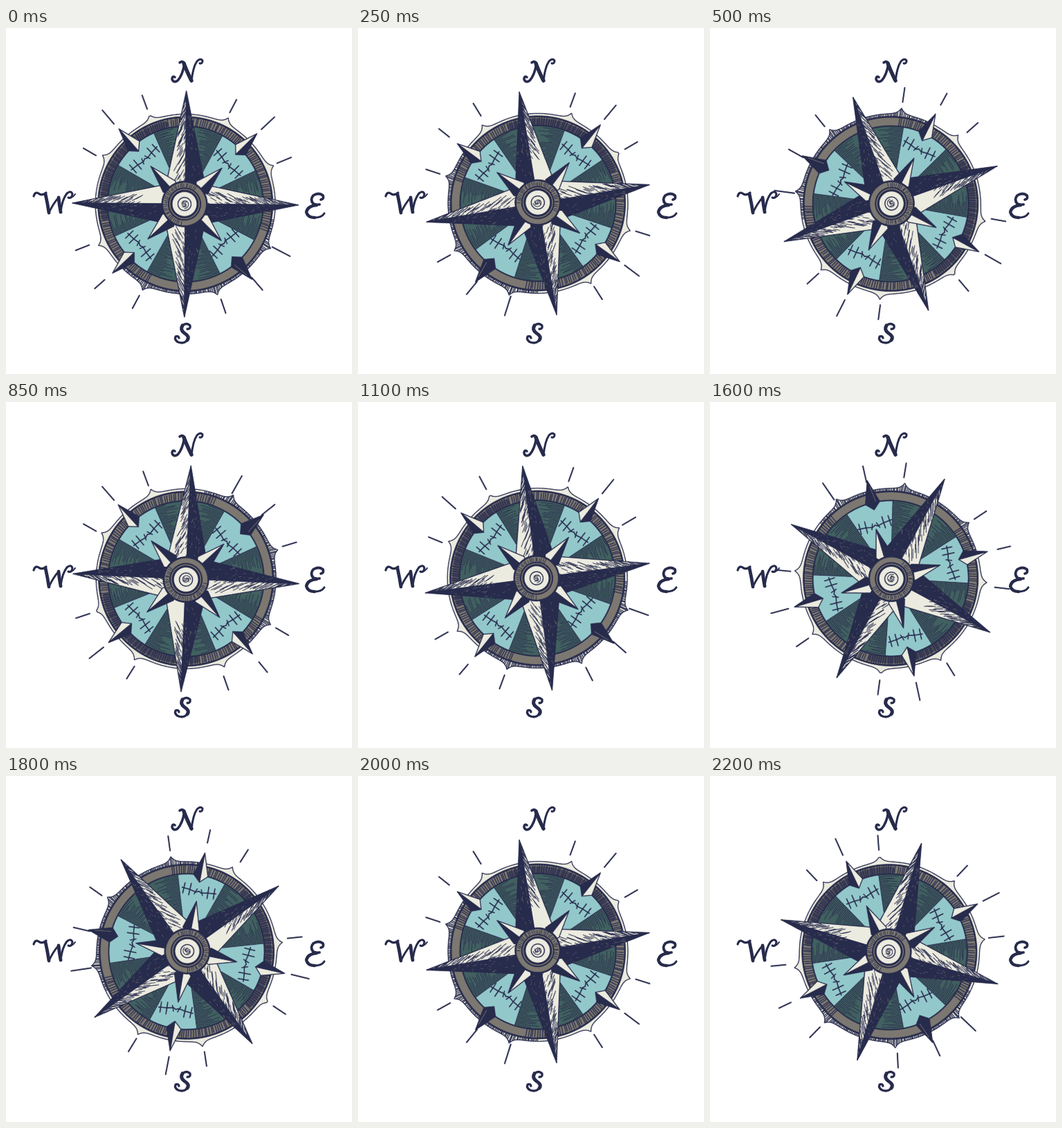
An HTML page with a canvas that plays this animation: 500x500 px, repeating every 2.25 s.

```html
<!DOCTYPE html>
<html lang="en">
<head>
<meta charset="utf-8">
<title>Compass rose</title>
<style>
html, body { margin: 0; width: 100%; height: 100%; overflow: hidden; background: #fff; }
canvas { display: block; width: 500px; height: 500px; }
</style>
</head>
<body>
<canvas id="stage" width="500" height="500" role="img" aria-label="Compass rose with N, E, S, W"></canvas>
<script>
const NAVY = '#272b4c', CREAM = '#ecebdf', GREY = '#7c7871', TEAL = '#416060', BLUE = '#93c8cb';
const CX = 260.2, CY = 254.4;
const STEP_MS = 50, STEPS = 45, TURN = 16, START = 0.5;
const SCALE = 2, SIZE = 400;

let seed = 11;
const rnd = () => (seed = (seed * 16807) % 2147483647) / 2147483647;
const vary = n => (rnd() * 2 - 1) * n;
const rad = d => d * Math.PI / 180;
const polar = (deg, r) => [r * Math.sin(rad(deg)), -r * Math.cos(rad(deg))];

const rose = document.createElement('canvas');
rose.width = rose.height = SIZE * SCALE;
const g = rose.getContext('2d');
g.scale(SCALE, SCALE);
g.translate(SIZE / 2 - 1, SIZE / 2);
g.lineCap = g.lineJoin = 'round';

function trace(pts, closed) {
  g.beginPath();
  pts.forEach(p => g.lineTo(p[0], p[1]));
  if (closed) g.closePath();
}
function poly(pts, fill, width = 1.2) {
  trace(pts, true);
  if (fill) { g.fillStyle = fill; g.fill(); }
  if (width) { g.strokeStyle = NAVY; g.lineWidth = width; g.stroke(); }
}
function line(pts, width, color = NAVY) {
  trace(pts);
  g.strokeStyle = color;
  g.lineWidth = width;
  g.stroke();
}
function disc(r, fill, width) {
  g.beginPath();
  g.arc(0, 0, r, 0, 7);
  if (fill) { g.fillStyle = fill; g.fill(); }
  if (width) { g.strokeStyle = NAVY; g.lineWidth = width; g.stroke(); }
}
function turned(deg, draw) {
  g.save();
  g.rotate(rad(deg));
  draw();
  g.restore();
}
function inside(pts, draw) {
  g.save();
  trace(pts, true);
  g.clip();
  draw();
  g.restore();
}
function spokes(from, to, step, r0, r1, width) {
  for (let a = from; a < to; a += step) {
    const d = a + vary(step * 0.3);
    line([polar(d, r0 + vary(1)), polar(d + 0.4, r1 + vary(1.5))], width);
  }
}

function drawRays() {
  // angle, inner radius, outer radius
  [[-42.2, 155, 181], [-22.4, 148, 169], [25.4, 147, 168], [45, 154, 180],
   [65.5, 145, 167], [115.8, 140, 169], [137.4, 143, 167], [159, 147, 168],
   [206.2, 148, 169], [226.3, 160, 179], [246.4, 151, 172], [298, 147, 168]]
    .forEach(([a, r0, r1]) => line([polar(a, r0), polar(a + 0.2, r1)], 2));
}

function drawRim() {
  const cusps = [-60, -22.5, 26, 66, 117, 160, 206, 244];
  const edge = [];
  for (let a = 0; a < 360; a++) {
    const d = Math.min(...cusps.map(c => Math.abs((a - c + 540) % 360 - 180)));
    edge.push(polar(a, 130 + 9 * Math.exp(-d / 2.2)));
  }
  poly(edge, CREAM, 1.3);
  inside(edge, () => spokes(100, 225, 1, 126, 138, 1.3));

  disc(127, NAVY);
  disc(124.5, GREY);
  spokes(205, 468, 1.6, 112, 124, 1.25);
  g.strokeStyle = NAVY;
  g.globalAlpha = 0.6;
  g.lineWidth = 10;
  g.beginPath();
  g.arc(0, 0, 118, rad(170), rad(255));
  g.stroke();
  g.globalAlpha = 1;
  disc(112.5, TEAL, 2);
}

function drawPanel(deg, runeR) {
  turned(deg, () => {
    const edge = [];
    for (let a = -18; a <= 18; a += 3.6) edge.push(polar(a, 112));
    edge.push(polar(18, 40), polar(-18, 40));
    poly(edge, BLUE, 0.8);
    g.translate(0, -runeR);
    for (const s of [-1, 1]) {
      line([[s * 25, -1], [s * 13, 0], [s * 4, 2], [0, 0]], 1.6);
      line([[s * 22, -8], [s * 22.5, 7]], 1.6);
      line([[s * 13, -9], [s * 13.5, 8]], 1.6);
      line([[s * 3, -3], [s * 6, 5]], 1.5);
    }
  });
}

function drawDial() {
  for (let q = 0; q < 4; q++) turned(q * 90, () => {
    for (const s of [-1, 1]) {
      for (let r = 50; r < 112; r += 2.3) {
        const end = 8 + rnd() * 12;
        line([polar(s * 29, r), polar(s * (29 + end) / 2, r), polar(s * end, r + vary(1))], 0.8);
      }
    }
  });
  [[46, 85], [135, 80], [227, 89], [317.5, 88]].forEach(p => drawPanel(...p));
}

// Small darts on the ring; lit is the bright side, 0 for a dark one.
function drawDart(deg, lit) {
  turned(deg, () => {
    for (const s of [-1, 1]) {
      poly([[0, -145], [s * 10.5, -112], [0, -102]], s === lit ? CREAM : NAVY, 1.3);
    }
    if (!lit) line([[1.5, -136], [5, -113]], 0.7, GREY);
  });
}

// reach is how far down the bright side the hatching runs, 0 to 1.
function drawSpike(deg, lit, reach) {
  turned(deg, () => {
    const tip = -163, base = -29, half = 28;
    const width = y => half * (y - tip) / (base - tip);
    const side = s => [[0, tip], [s * half, base], [0, 0]];
    poly(side(-lit), NAVY, 1.4);
    poly(side(lit), CREAM, 1.4);
    inside(side(lit), () => {
      for (let y = tip + 8; y < tip + 134 * reach; y += 2.7) {
        const x = lit * width(y) * (0.1 + rnd() * 0.45);
        const len = 7 + rnd() * 7;
        line([[x, y], [x + lit * len * 0.55, y + len]], 0.9);
        if (rnd() < 0.5) line([[0, y], [lit * 3, y + 6]], 0.9);
      }
    });
    inside(side(-lit), () => {
      for (let i = 0; i < 34; i++) {
        const y = tip + 35 + rnd() * 92;
        const x = -lit * rnd() * width(y);
        line([[x, y], [x + vary(1.5), y + 1 + rnd() * 3]], 0.5, GREY);
      }
    });
    line([[0, tip], [0, base]], 1.4);
  });
}

function drawStar(deg, lit) {
  turned(deg, () => {
    for (const s of [-1, 1]) {
      poly([[0, -74], [s * 12, -34], [0, -20]], s === lit ? CREAM : NAVY, 1.3);
    }
  });
}

function drawHub() {
  g.save();
  g.translate(-1.2, 0);
  disc(33.5, NAVY);
  disc(31, GREY);
  spokes(190, 395, 6, 25, 30, 0.9);
  disc(24, NAVY);
  disc(22, GREY);
  disc(20.5, NAVY);
  disc(17.5, CREAM);
  disc(9.5, null, 1.4);
  const coil = [];
  for (let a = 0; a < 560; a += 20) coil.push(polar(a, 1 + a / 95));
  line(coil, 1);
  line([[3, -3], [-2, -3], [-2, 0], [2, 1], [2, 4], [-3, 4]], 1.1);
  g.restore();
}

drawRays();
drawRim();
drawDial();
[[45, -1], [138, 0], [226, 1], [318, 1]].forEach(d => drawDart(...d));
[[0, -1, 1], [90, -1, 0.95], [180, 1, 0.9], [270, 1, 0.7]].forEach(d => drawSpike(...d));
[[45, -1], [135, -1], [226.5, 1], [317, 1]].forEach(d => drawStar(...d));
drawHub();

// Hand lettering: stroke width and path
const letters = [
  [3.6, 'M251 50Q255 47 258 51Q255 69 248 76Q242 80 240 74Q240 69 244 71'],
  [5.4, 'M257 51Q261 62 268 76'],
  [3, 'M268 77Q270 57 276 48Q281 43 284 47Q284 52 280 51'],
  [3.2, 'M40 243Q42 236 47 239Q52 243 58 238'],
  [4.8, 'M57 240Q60 253 62 267'],
  [2.8, 'M62 267Q68 254 76 245'],
  [4.8, 'M76 245Q77 256 79 266'],
  [3, 'M79 266Q81 248 88 239Q94 234 96 240Q95 247 90 245'],
  [2, 'M91 245Q96 246 100 240'],
  [3.8, 'M455 248Q460 247 458 242Q452 237 444 242Q439 248 444 254Q448 256 453 255'],
  [4.4, 'M449 256Q436 257 434 266Q436 274 446 274'],
  [3.1, 'M446 274Q456 274 460 268'],
  [3.3, 'M262 435Q267 435 266 430Q261 425 255 430'],
  [5, 'M255 430Q251 436 258 441Q266 446 262 451'],
  [3.3, 'M262 451Q257 457 249 454Q243 451 245 446Q249 444 250 448']
].map(([w, d]) => [w, new Path2D(d)]);

const ctx = document.getElementById('stage').getContext('2d');
ctx.imageSmoothingQuality = 'high';

function render(ms) {
  const k = Math.floor(ms / STEP_MS) % STEPS;
  const swing = k < STEPS / 2 ? k : STEPS - k;
  ctx.fillStyle = '#fff';
  ctx.fillRect(0, 0, 500, 500);
  ctx.save();
  ctx.translate(CX, CY);
  ctx.rotate(rad(START + TURN * swing));
  ctx.drawImage(rose, -SIZE / 2, -SIZE / 2, SIZE, SIZE);
  ctx.restore();
  ctx.strokeStyle = NAVY;
  ctx.lineCap = ctx.lineJoin = 'round';
  for (const [w, path] of letters) {
    ctx.lineWidth = w;
    ctx.stroke(path);
  }
}

const begin = performance.now();
function tick() {
  render(performance.now() - begin);
  requestAnimationFrame(tick);
}
tick();
</script>
</body>
</html>
```
